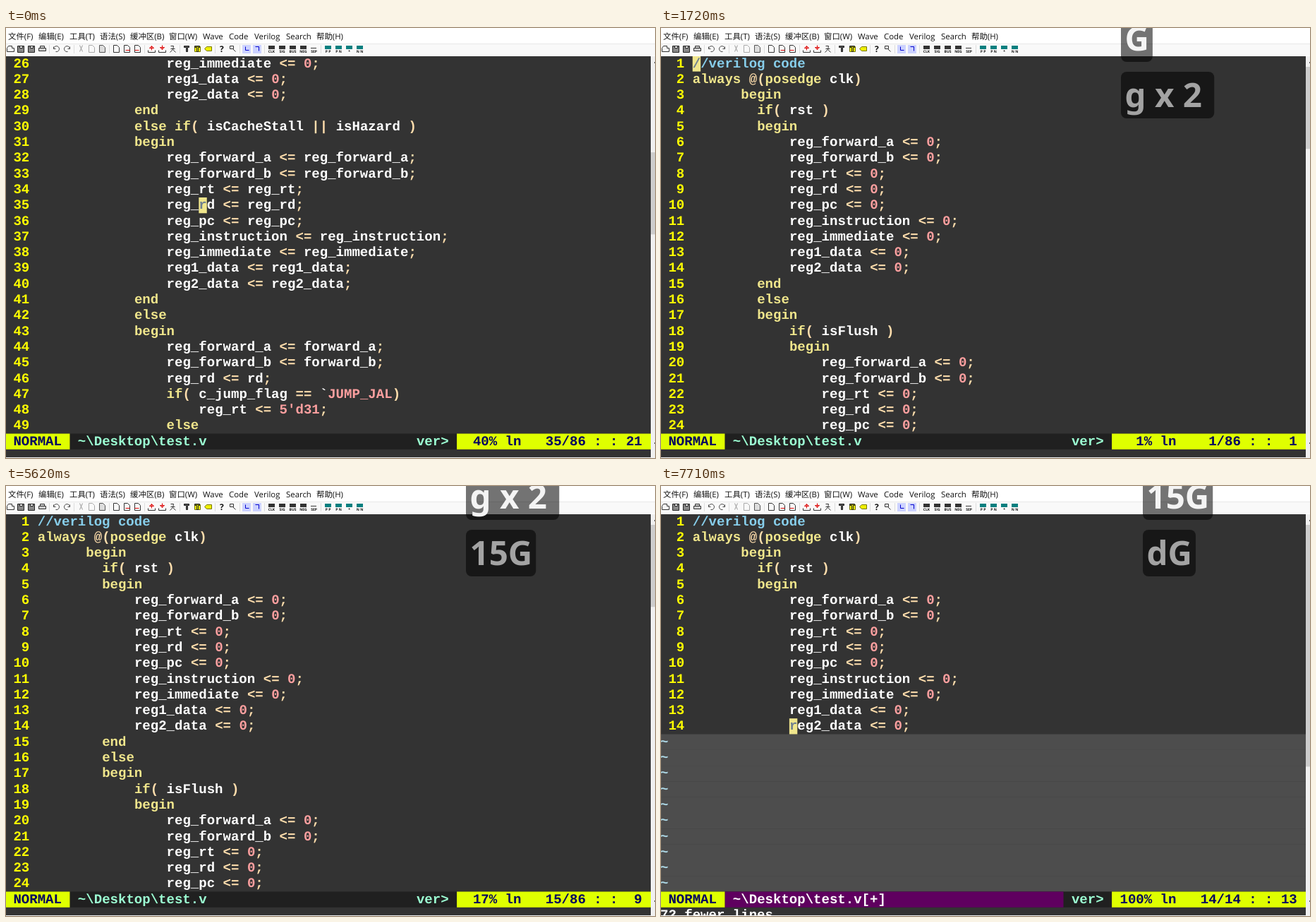
These frames come from a looping animation (920x609 px, 8 s). An HTML page with a canvas:

```html
<!DOCTYPE html>
<html lang="zh">
<head>
<meta charset="utf-8">
<style>
html, body { margin: 0; width: 920px; height: 609px; overflow: hidden; }
canvas { display: block; }
</style>
</head>
<body>
<canvas id="stage" width="920" height="609"></canvas>
<script>
const ctx = document.getElementById('stage').getContext('2d');
const CODE = '19.05px "Liberation Mono", monospace';
const CELL = 11.43, ROW = 22.3, TOP = 39.3, GUTTER = 4, ROWS = 24, LOOP = 8000;
const KHAKI = '#f0e68c', NAVAJO = '#ffdead', PINK = '#ffa0a0', MINT = '#9cffd3', LIME = '#dfff00';

// Visible stretches of the file, keyed by their first line number.
const pages = {
1: `//verilog code
always @(posedge clk)
      begin
        if( rst )
        begin
            reg_forward_a <= 0;
            reg_forward_b <= 0;
            reg_rt <= 0;
            reg_rd <= 0;
            reg_pc <= 0;
            reg_instruction <= 0;
            reg_immediate <= 0;
            reg1_data <= 0;
            reg2_data <= 0;
        end
        else
        begin
            if( isFlush )
            begin
                reg_forward_a <= 0;
                reg_forward_b <= 0;
                reg_rt <= 0;
                reg_rd <= 0;
                reg_pc <= 0;`,
26: `                reg_immediate <= 0;
                reg1_data <= 0;
                reg2_data <= 0;
            end
            else if( isCacheStall || isHazard )
            begin
                reg_forward_a <= reg_forward_a;
                reg_forward_b <= reg_forward_b;
                reg_rt <= reg_rt;
                reg_rd <= reg_rd;
                reg_pc <= reg_pc;
                reg_instruction <= reg_instruction;
                reg_immediate <= reg_immediate;
                reg1_data <= reg1_data;
                reg2_data <= reg2_data;
            end
            else
            begin
                reg_forward_a <= forward_a;
                reg_forward_b <= forward_b;
                reg_rd <= rd;
                if( c_jump_flag == \`JUMP_JAL)
                    reg_rt <= 5'd31;
                else`,
63: `                    reg2_data <= registers[rt];
            end
        end
      end

//C code
#include <stdio.h>
int main() {
    int n1, n2, min;
    printf("Enter two positive integers: ");
    scanf("%d %d", &n1, &n2);

    // maximum number between n1 and n2 is stored in min
    min = (n1 > n2) ? n1 : n2;

    while (1) {
        if (min % n1 == 0 && min % n2 == 0) {
            printf("The LCM of %d and %d is %d.", n1, n2, min);
            break;
        }
        ++min;
    }
    return 0;
}`
};
for (const first in pages) pages[first] = pages[first].split('\n');

const jumped = { first: 63, line: 86, col: 0, match: [70, 11], left: 741, keys: ['G'] };
const top1 = { first: 1, line: 1, col: 0, left: 652, keys: ['G', 'g x 2 '] };
const at15 = { first: 1, line: 15, col: 8, left: 652, keys: ['g x 2 ', '15G'] };
const cut = { first: 1, line: 14, col: 12, total: 14, left: 652, keys: ['15G', 'dG'], message: '72 fewer lines' };
const states = [
  [0, { first: 26, line: 35, col: 20, keys: [] }],
  [210, jumped],
  [1540, { ...jumped, keys: ['G', 'g'], pending: 'g' }],
  [1720, top1],
  [4190, { ...top1, keys: ['g x 2 ', '1'], pending: '1' }],
  [4400, { ...top1, keys: ['g x 2 ', '15'], pending: '15' }],
  [4930, at15],
  [6720, { ...at15, keys: ['15G', 'd'], pending: 'd', half: true }],
  [7460, cut],
  [7710, { ...cut, left: 683 }]
];
const blinks = [920, 1170, 2460, 2710, 3080, 3360, 3730, 3950, 5620, 5890, 6290, 6540];

const cellX = col => col * CELL - 1;
const rowY = row => TOP + row * ROW;

function rect(x, y, w, h, color) {
  ctx.fillStyle = color;
  ctx.fillRect(x, y, w, h);
}
function cells(col, row, count, color) {
  rect(cellX(col), rowY(row), count * CELL, ROW, color);
}
function text(str, x, y, color, font) {
  ctx.font = font;
  ctx.fillStyle = color;
  ctx.fillText(str, x, y);
}
function type(str, col, row, color) {
  text(str, cellX(col), rowY(row) + 16.2, color, 'bold ' + CODE);
}

const tokens = /\/\/.*|"[^"]*"|\d+'\w+|\w+|[^\w\s]/g;
const keywords = /^(always|posedge|begin|end|if|else|while|include)$/;
function tokenColor(word) {
  if (word.startsWith('//')) return '#87ceeb';
  if (/^("|\d|[A-Z][A-Z0-9_]+$)/.test(word)) return PINK;
  if (keywords.test(word)) return KHAKI;
  return /^[\w`]/.test(word) ? '#fff' : NAVAJO;
}

// Toolbar icons: centre x, path, stroke, fill.
const sheet = 'M-4-5h5l3 3v7h-8z', disk = 'M-5-4h9v9h-9zM-2-4v3h4v-3';
const hammer = 'M-4-4h7v2h-2v6h-2v-6h-3z', tray = 'M-5 2v3h10v-3';
const icons = [
  [6, 'M-5-1l2-3h5v3h3v5h-10z', '#333'],
  [21, disk, '#222', '#888'], [36, disk, '#222', '#888'],
  [51, 'M-3-4h6v3h-6zM-5-1h10v4h-10z', '#333', '#ccc'],
  [71, 'M-4-3v3h3M-4 0a4 4 0 1 1 3 4', '#444'],
  [86, 'M4-3v3h-3M4 0a4 4 0 1 0-3 4', '#444'],
  [106, 'M-2-5l4 9M2-5l-4 9', '#999'],
  [121, sheet, '#aaa'], [136, sheet, '#555', '#ddd'],
  [156, sheet, '#333'], [171, sheet, '#333'], [186, sheet, '#333'],
  [171, 'M-2 2h6', '#d00'], [186, 'M-4 2h6', '#d00'],
  [206, tray, '#333'], [206, 'M0 2v-6l-3 3h6l-3-3', '#d00'],
  [221, tray, '#333'], [221, 'M0-5v6l-3-3h6l-3 3', '#d00'],
  [236, 'M-3-4h4l-1 5l-4 4M0 1l4 4M-3 0h6', '#333'],
  [256, hammer, '#222', '#555'],
  [271, 'M-4-3h8v7h-8z', '#770', '#ee0'], [271, hammer, '#222'],
  [286, 'M-5 0l3-3h7v6h-7z', '#770', '#ee0'],
  [321, 'M-4-4h5v4h-5zM0 0l4 4', '#333'],
  [341, 'M-2-3v5h5', '#00c'], [356, 'M-3-3h5v6', '#00c']
];
const menus = { 3: '文件(F)', 46: '编辑(E)', 90: '工具(T)', 133: '语法(S)', 176: '缓冲区(B)', 231: '窗口(W)',
  279: 'Wave', 316: 'Code', 352: 'Verilog', 397: 'Search', 440: '帮助(H)' };
const labels = ['CLK', 'SIG', 'BUS', 'NEG', 'SEP', 'P P', 'P N', '*', 'N N'];

function drawBars() {
  rect(0, 0, 920, 40, '#fff');
  rect(0, 22, 920, 17, '#f9f9f9');
  rect(0, 22, 920, 1, '#e8e8e8');
  for (const x in menus) text(menus[x], +x, 16, '#111', '11.4px "Open Sans", "Noto Sans CJK SC", sans-serif');
  for (const x of [61, 96, 146, 196, 246, 296, 331, 366, 446]) rect(x, 24, 1, 12, '#ddd');
  for (const x of [335, 350]) rect(x, 24, 12, 12, '#ccd2ff');
  ctx.lineWidth = 1;
  for (const [x, path, stroke, fill] of icons) {
    const shape = new Path2D(path);
    ctx.save();
    ctx.translate(x + 0.5, 29.5);
    if (fill) { ctx.fillStyle = fill; ctx.fill(shape); }
    ctx.strokeStyle = stroke;
    ctx.stroke(shape);
    ctx.restore();
  }
  text('?', 303, 34, '#111', 'bold 12px "Open Sans", sans-serif');
  ctx.textAlign = 'center';
  labels.forEach((label, i) => {
    const x = 376 + i * 15 + (i > 4 ? 5 : 0);
    if (i === 4) rect(x - 4, 28, 8, 1, '#333');
    else rect(x - 4, 25, 9, 5, i > 4 ? '#087f7f' : '#333');
    text(label, x + 0.5, 35, '#111', 'bold 5px "Open Sans", sans-serif');
  });
  ctx.textAlign = 'left';
}

function drawCode(s, total, cursorOn) {
  rect(0, 39.3, 914, 568.7, '#333');
  if (s.match) cells(GUTTER + s.match[1], s.match[0] - s.first, 1, '#008b8b');
  for (let row = 0; row < ROWS; row++) {
    const number = s.first + row;
    if (number > total) {
      rect(0, rowY(row), 914, ROW + 0.1, '#4d4d4d');
      type('~', 0, row, '#add8e6');
      continue;
    }
    type(String(number).padStart(3), 0, row, '#ff0');
    for (const { 0: word, index } of pages[s.first][row].matchAll(tokens))
      type(word, GUTTER + index, row, tokenColor(word));
  }
  if (!cursorOn) return;
  const row = s.line - s.first, col = GUTTER + s.col;
  if (s.half) {
    rect(cellX(col), rowY(row) + ROW / 2, CELL, ROW / 2, KHAKI);
  } else {
    cells(col, row, 1, KHAKI);
    type(pages[s.first][row][s.col], col, row, '#708090');
  }
}

function drawStatus(s, total) {
  const changed = total < 86;
  rect(0, rowY(ROWS), 914, ROW, '#202020');
  if (changed) cells(8, ROWS, 42, '#5f005f');
  cells(0, ROWS, 8, LIME);
  rect(cellX(56), rowY(ROWS), 914 - cellX(56), ROW, LIME);
  type('NORMAL', 1, ROWS, '#00005f');
  type('~\\Desktop\\test.v' + (changed ? '[+]' : ''), 9, ROWS, changed ? '#fff' : MINT);
  type('ver>', 51, ROWS, MINT);
  const percent = String(Math.floor(s.line * 100 / total)).padStart(3);
  const place = `${s.line}/${total}`.padStart(5);
  type(`${percent}% ln   ${place} : : ${String(s.col + 1).padStart(2)}`, 57, ROWS, '#00005f');
  if (s.message) type(s.message, 0, ROWS + 1, '#fff');
  if (s.pending) type(s.pending, 69, ROWS + 1, '#fff');
  rect(0, 608, 920, 1, '#f0f0f0');
}

function drawScrollbar(s, total) {
  const step = 528 / (total + ROWS - 1);
  rect(914, 39.3, 6, 569, '#f0f0f0');
  rect(914, 55 + (s.first - 1) * step, 6, ROWS * step, '#cdcdcd');
  for (const y of [48, 587]) rect(919, y, 1, 2, '#555');
}

function drawKeys(s) {
  ctx.globalAlpha = 0.55;
  s.keys.forEach((key, i) => {
    const y = 62 - 80 * (s.keys.length - 1 - i);
    ctx.font = 'bold 47.5px "Noto Sans", sans-serif';
    const path = new Path2D();
    path.roundRect(s.left, y, ctx.measureText(key).width + 10.5, 66, 8);
    ctx.fillStyle = '#000';
    // The plate and its letters share one translucent layer.
    const before = ctx.globalAlpha;
    ctx.fill(path);
    ctx.globalAlpha = 1;
    const white = y < 0 ? '#f4f4f4' : '#a3a3a3';
    text(key, s.left + 5.5, y + 50, white, ctx.font);
    ctx.globalAlpha = before;
  });
  ctx.globalAlpha = 1;
}

function draw(now) {
  const t = now % LOOP;
  const s = states.filter(([start]) => start <= t).pop()[1];
  const total = s.total || 86;
  const cursorOn = blinks.filter(b => b <= t).length % 2 === 0;
  drawCode(s, total, cursorOn);
  drawStatus(s, total);
  drawScrollbar(s, total);
  drawBars();
  drawKeys(s);
}

ctx.textRendering = 'geometricPrecision';
const began = performance.now();
function tick() {
  draw(performance.now() - began);
  requestAnimationFrame(tick);
}
tick();
</script>
</body>
</html>
```
